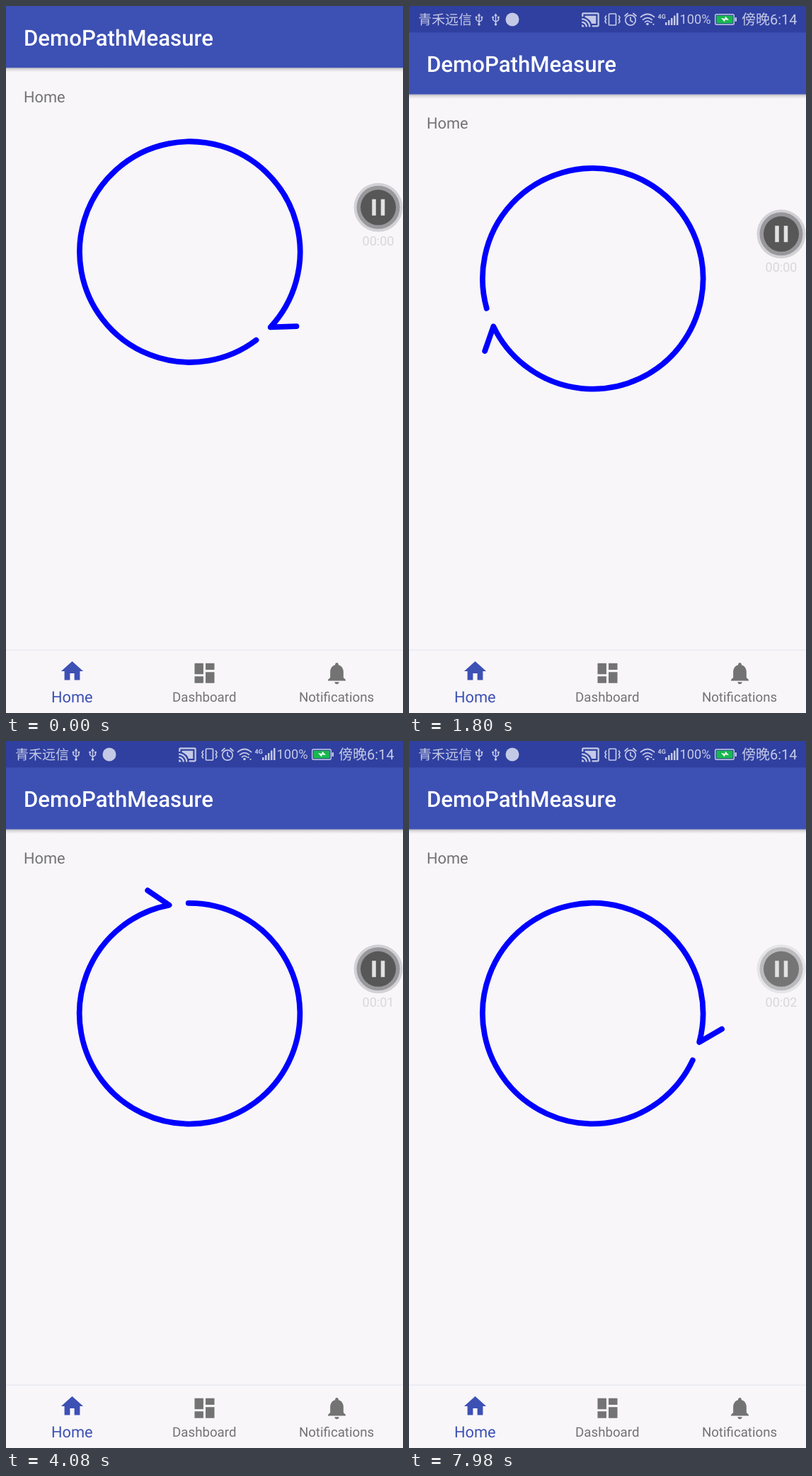
These frames come from a looping animation (561 by 998 pixels, 8 s). An HTML page:

```html
<!DOCTYPE html>
<html lang="en">
<head>
<meta charset="utf-8">
<title>DemoPathMeasure</title>
<style>
  html, body { margin: 0; width: 100%; height: 100%; overflow: hidden; background: #f8f6f9; }
  svg { display: block; font-family: Roboto, "Noto Sans CJK SC", "Noto Sans CJK", sans-serif; text-rendering: geometricPrecision; }
  .line { fill: none; stroke: #c4c9e6; stroke-width: 1.7; stroke-linecap: round; stroke-linejoin: round; }
</style>
</head>
<body>
<svg width="561" height="998" viewBox="0 0 561 998">
  <defs>
    <linearGradient id="shadow" x1="0" y1="0" x2="0" y2="1">
      <stop offset="0" stop-color="#000" stop-opacity=".26"/>
      <stop offset=".45" stop-color="#000" stop-opacity=".09"/>
      <stop offset="1" stop-color="#000" stop-opacity="0"/>
    </linearGradient>
    <g id="usb" transform="translate(0 2.500) scale(.87)">
      <path class="line" d="M0 12V27M-4.500 16v3.500L0 23L4.500 20V16"/>
      <path fill="#c4c9e6" d="M0 9l2.800 4.500h-5.600zM3 14h3v3H3z"/>
      <circle cx="-4.500" cy="15.500" r="1.700" fill="#c4c9e6"/>
      <circle cy="27" r="2" fill="#c4c9e6"/>
    </g>
  </defs>
  <rect width="561" height="998" fill="#f8f6f9"/>

  <g id="content">
    <rect y="124.700" width="561" height="6.500" fill="url(#shadow)"/>
    <rect y="37" width="561" height="87.700" fill="#3d50b4"/>
    <rect width="561" height="37.400" fill="#3040a0"/>
    <text x="25" y="93" font-size="31.160" font-weight="500" fill="#fff">DemoPathMeasure</text>
    <text x="25" y="173.300" font-size="21.800" fill="#737373">Home</text>
    <path id="arrow" d="M181.800 -26L155.800 0A155.800 155.800 0 1 0 153.400 27.100" fill="none" stroke="#00f"
      stroke-width="7.800" stroke-linecap="round" stroke-linejoin="round"/>
  </g>

  <g id="status" fill="#c4c9e6">
    <text x="13" y="26" font-size="19">青禾远信</text>
    <use href="#usb" x="99"/>
    <use href="#usb" x="122.500"/>
    <circle cx="146" cy="19" r="9.500"/>
    <path transform="translate(243 6) scale(1.12)" d="M21 3H3c-1.100 0-2 .9-2 2v3h2V5h18v14h-7v2h7c1.100 0 2-.9 2-2V5c0-1.100-.9-2-2-2zM1 18v3h3c0-1.660-1.340-3-3-3zm0-4v2c2.760 0 5 2.240 5 5h2c0-3.870-3.130-7-7-7zm0-4v2c4.970 0 9 4.030 9 9h2c0-6.080-4.930-11-11-11zM19 7H5v1.630c3.960 1.280 7.090 4.410 8.370 8.370H19z"/>
    <g class="line">
      <rect x="282.500" y="11" width="10" height="16" rx="1"/>
      <path d="M278.500 14l-1.500 2.500 1.500 2.500-1.500 2.500 1.500 2.500M296.500 14l1.500 2.500-1.500 2.500 1.500 2.500-1.500 2.500"/>
      <circle cx="313" cy="20" r="7.200"/>
      <path d="M313 16v4.500l3 2M305 14l4-3.500M321 14l-4-3.500"/>
      <path d="M327.500 15.500q9.500-8 19 0M330.500 19.300q6.500-5.500 13 0M333.500 22.700q3.500-3 7 0"/>
    </g>
    <circle cx="337" cy="25.500" r="1.800"/>
    <path d="M341 24h3l-1.500-2.500zM344 25h3l-1.500 2.500z"/>
    <text x="351.500" y="18" font-size="9" font-weight="700">4G</text>
    <path d="M362 23h2.500v4H362zM366 20h2.500v7H366zM370 17h2.500v10H370zM374 13.500h2.500V27H374zM378 10h2.500v17H378z"/>
    <text x="382.500" y="25" font-size="18.300">100%</text>
    <rect x="432.700" y="11.700" width="26.600" height="14.600" rx="2" fill="none" stroke="#c4c9e6" stroke-width="1.400"/>
    <rect x="434.500" y="13.500" width="23" height="11" fill="#18b84e"/>
    <rect x="460.500" y="16" width="2.500" height="6" rx="1"/>
    <path d="M441 17l5.500 1 .5-3.500 5 5.500-5.500-.8-.5 3.300z" fill="#fff"/>
    <text x="470" y="26" font-size="20">傍晚6:14</text>
  </g>

  <g id="recorder">
    <circle id="ring" cx="526" cy="321.800" r="34.500"/>
    <circle id="rim" cx="526" cy="321.800" r="30.500"/>
    <circle id="disc" cx="526" cy="321.800" r="25"/>
    <path d="M520 313v17.500M532.500 313v17.500" stroke="#e2e2e2" stroke-width="5.500" stroke-linecap="square"/>
    <text id="clock" x="526" y="375" font-size="18" fill="#d8d7da" text-anchor="middle"></text>
  </g>

  <rect y="908.500" width="561" height="1.500" fill="#e9eaf3"/>
  <g fill="#737373" text-anchor="middle" font-size="18.700">
    <g fill="#3d50b4">
      <path transform="translate(74.800 920.300) scale(1.558)" d="M10 20v-6h4v6h5v-8h3L12 3 2 12h3v8z"/>
      <text x="93.300" y="982.500" font-size="21.800">Home</text>
    </g>
    <path transform="translate(261.800 923) scale(1.558)" d="M3 13h8V3H3zm0 8h8v-6H3zm10 0h8V11h-8zm0-18v6h8V3z"/>
    <text x="280.300" y="982.300">Dashboard</text>
    <path transform="translate(448.800 923) scale(1.558)" d="M12 22c1.100 0 2-.9 2-2h-4c0 1.100.89 2 2 2zm6-6v-5c0-3.070-1.640-5.640-4.500-6.320V4c0-.83-.67-1.500-1.500-1.500s-1.500.67-1.500 1.500v.68C7.630 5.360 6 7.920 6 11v5l-2 2v1h16v-1z"/>
    <text x="467" y="982.300">Notifications</text>
  </g>
</svg>
<script>
const LOOP = 8000, BAR = 37.5;
const $ = id => document.getElementById(id);
const move = (id, y) => $(id).setAttribute('transform', `translate(0 ${y})`);

// Uneven playback: steps are held 100, 20 and 20 ms, with one extra 20 ms step.
function stepAt(ms) {
  if (ms < 20) return 0;
  const late = ms >= 4520;
  const u = ms - (late ? 40 : 20), part = u % 140;
  return 1 + 3 * Math.floor(u / 140) + (part >= 100) + (part >= 120) + late;
}

// One turn takes 180 steps, eased in and out, sweeping 350 degrees.
function headAngle(step) {
  const lag = 0.9 * Math.max(0, 1 - step / 19);
  const phase = (step + lag + 71.8) % 180;
  return 280 + 175 * (1 - Math.cos(phase * Math.PI / 180));
}

function draw(ms) {
  const step = stepAt(ms);
  const left = 1 - Math.min(1, Math.max(0, (step - 4) / 22));
  move('content', step < 4 ? -BAR : 0);
  move('status', -BAR * left ** 5);
  move('recorder', -BAR * left ** 3);
  $('arrow').setAttribute('transform', `translate(259.7 384.7) rotate(${headAngle(step)})`);

  const idle = step >= 98;
  $('ring').setAttribute('fill', idle ? '#e5e4e8' : '#d2d1d6');
  $('rim').setAttribute('fill', idle ? '#bbbabd' : '#98979b');
  $('disc').setAttribute('fill', idle ? '#757575' : '#575757');
  $('clock').textContent = '00:0' + (step < 68 ? 0 : step < 128 ? 1 : 2);
}

const start = performance.now();
function tick() {
  draw((performance.now() - start) % LOOP);
  requestAnimationFrame(tick);
}
tick();
</script>
</body>
</html>
```
